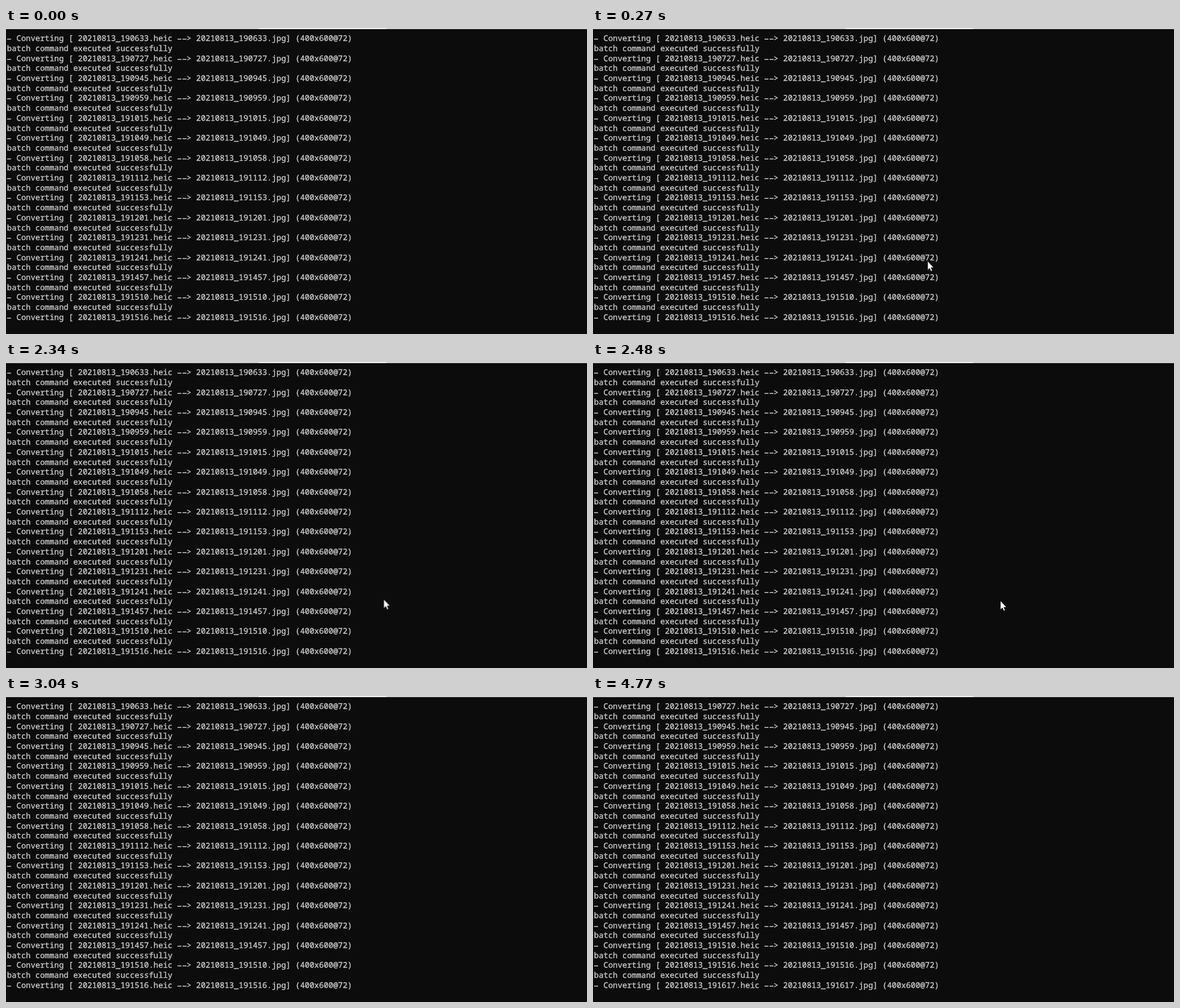
These frames come from a looping animation (1030 by 544 pixels, 6.55 s). An HTML page:

```html
<!DOCTYPE html>
<html lang="en">
<head>
<meta charset="utf-8">
<title>Batch conversion</title>
<style>
  :root { --loop: 6550ms; --row: 17.7px; }
  html, body { margin: 0; width: 100%; height: 100%; overflow: hidden; background: #0c0c0c; }
  #stage { position: relative; width: 1030px; height: 544px; overflow: hidden; background: #0c0c0c; }
  #edge {
    position: absolute; inset: 0 0 auto; height: 1.6px;
    background: linear-gradient(90deg, #d2d2d2 448px, #f2f2f2 448px 674px, #d2d2d2 674px);
  }
  #screen {
    position: absolute; left: 1.8px; top: 10.2px; width: 1000px;
    height: calc(29 * var(--row)); overflow: hidden;
  }
  #log {
    position: absolute; left: 0; top: 0; margin: 0; color: #ccc;
    font: 13.98px/var(--row) "Noto Sans Mono", "DejaVu Sans Mono", monospace;
    text-rendering: geometricPrecision; font-variant-ligatures: none;
    -webkit-text-stroke: 0.35px #ccc;
    animation: scroll var(--loop) step-end infinite;
  }
  /* wide terminal dash */
  #log i {
    font-style: normal; color: transparent; -webkit-text-stroke: 0;
    background: linear-gradient(#ccc, #ccc) 0.7px 57% / 7.2px 1.5px no-repeat;
  }
  #pointer {
    position: absolute; left: 0; top: 0; width: 14px; height: 20px; overflow: visible;
    animation: move var(--loop) step-end infinite, show var(--loop) step-end infinite;
  }
  @keyframes scroll {
    0% { top: 0; }
    65.801% { top: calc(-1 * var(--row)); }
    72.824%, 100% { top: calc(-2 * var(--row)); }
  }
  @keyframes show {
    0% { visibility: hidden; }
    1.984% { visibility: visible; }
    46.412%, 100% { visibility: hidden; }
  }
  @keyframes move {
    0% { transform: translate(892px, 504px); }
    1.984% { transform: translate(892px, 504px); animation-timing-function: steps(2); }
    4.122% { transform: translate(593px, 414px); }
    33.587% { transform: translate(617px, 419px); animation-timing-function: steps(4); }
    37.862% { transform: translate(722px, 424px); animation-timing-function: steps(5); }
    43.206% { transform: translate(918px, 428px); animation-timing-function: steps(2); }
    45.343%, 100% { transform: translate(986px, 432px); }
  }
</style>
</head>
<body>
<div id="stage">
  <div id="edge"></div>
  <div id="screen"><pre id="log"></pre></div>
  <svg id="pointer" viewBox="0 0 14 20">
    <path d="M.3 .5V16.2L3.8 12.9 6.2 18.4 8.6 17.4 6.3 12H11Z" fill="#fff" stroke="#0c0c0c" stroke-width=".6"/>
  </svg>
</div>
<script>
  const stamps = ("190633 190727 190945 190959 191015 191049 191058 191112 " +
    "191153 191201 191231 191241 191457 191510 191516 191617").split(" ");
  const dash = "<i>-</i>";
  const convert = stamp => {
    const name = "20210813_" + stamp;
    return `${dash} Converting [ ${name}.heic ${dash}${dash}&gt; ${name}.jpg] (400x600@72)`;
  };
  document.getElementById("log").innerHTML =
    stamps.map(convert).join("\nbatch command executed successfully\n");
</script>
</body>
</html>
```
